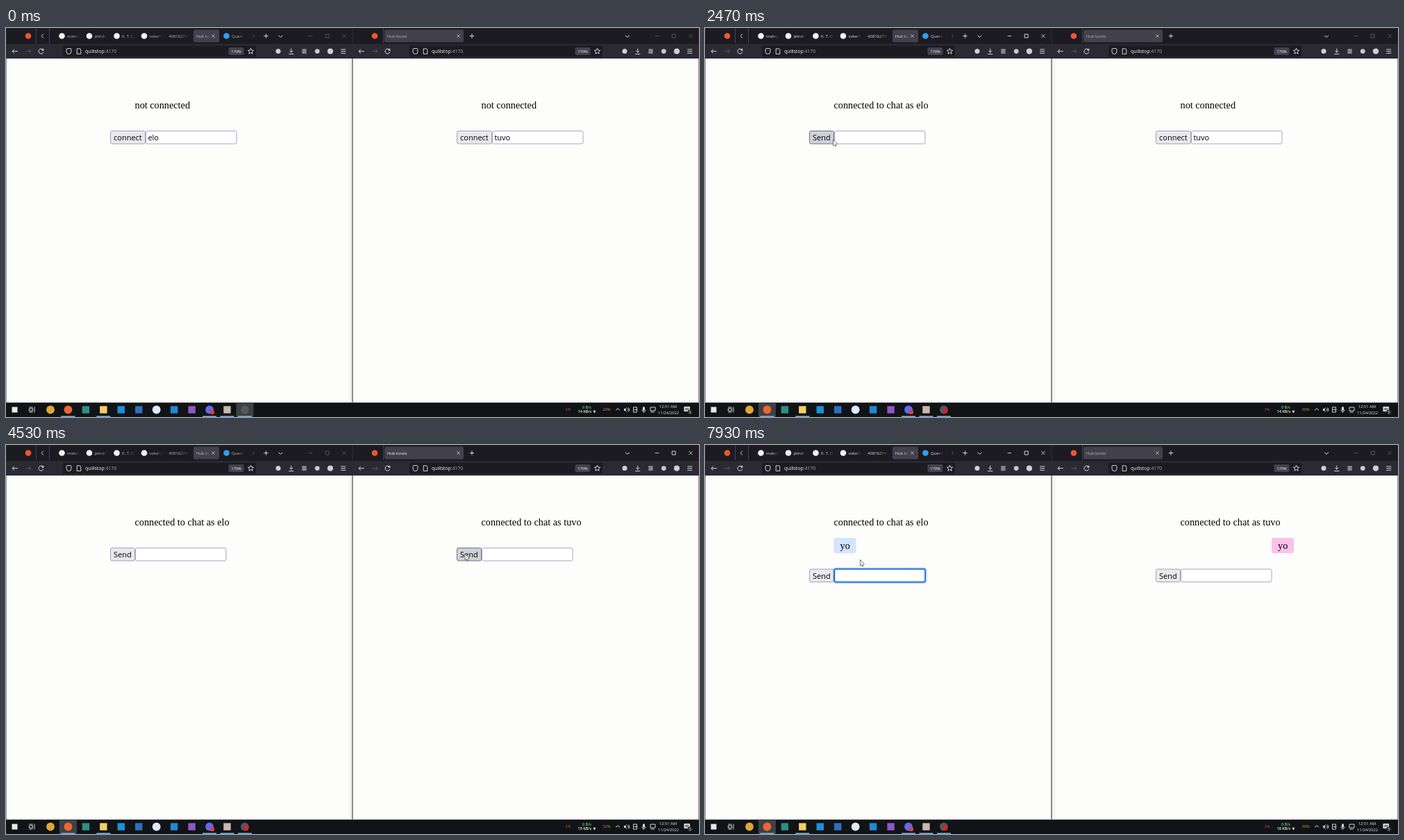
An HTML page with a canvas that plays this animation: 998 by 561 pixels, repeating every 8000 ms.

```html
<!DOCTYPE html>
<html lang="en">
<head>
<meta charset="utf-8">
<title>Two-window chat</title>
<style>
  html, body { margin: 0; width: 100%; height: 100%; overflow: hidden; background: #111417; }
  canvas { display: block; width: 998px; height: 561px; }
</style>
</head>
<body>
<canvas id="stage" width="998" height="561"></canvas>
<script>
const ctx = document.getElementById('stage').getContext('2d');
const W = 998, H = 561, HALF = W / 2, LOOP = 8000;
const PX = W / 1920;              // one desktop pixel on the stage
const PAGE_TOP = 85 * PX, PAGE_END = 1040 * PX;
const SANS = '"Open Sans", "Noto Sans", sans-serif';
const SERIF = '"Liberation Serif", serif';
const LIGHT = '#e8e8ec', DIM = '#5c5b66', DARK = '#1c1b22', BAR = '#2b2a33', TAB = '#42414d';

const USERS = ['elo', 'tuvo'];
const SITE = 'Hub boots';
const AT = {
  record: 400, press: 2090, leftOn: 2210, rightPress: 4405, rightOn: 4490,
  focus: 5480, typeY: 6480, typeO: 7120, send: 7370
};

const START = { x: 420, y: 575 };
const MOVES = [
  { from: 700, to: 1420, x: 184.5, y: 161, bend: 0 },
  { from: 2700, to: 3300, x: 546, y: 197, bend: 65 },
  { from: 3360, to: 4180, x: 661, y: 157, bend: 8 },
  { from: 4640, to: 5180, x: 223.5, y: 165.5, bend: 0 }
];

function pointer(t) {
  let { x, y } = START;
  for (const m of MOVES) {
    const p = Math.min(1, Math.max(0, (t - m.from) / (m.to - m.from)));
    const e = p * p * (3 - 2 * p);
    x += (m.x - x) * e;
    y += (m.y - y) * e - m.bend * Math.sin(Math.PI * e);
  }
  return { x, y };
}

// Drawing helpers
function rect(x, y, w, h, color) {
  ctx.fillStyle = color;
  ctx.fillRect(x, y, w, h);
}

function stroke(color, lw = 0.9) {
  ctx.strokeStyle = color;
  ctx.lineWidth = lw;
  ctx.stroke();
}

function round(x, y, w, h, r, fill, line, lw) {
  ctx.beginPath();
  ctx.roundRect(x, y, w, h, r);
  if (fill) { ctx.fillStyle = fill; ctx.fill(); }
  if (line) stroke(line, lw);
}

// Outlined box around a centre
const box = (x, y, w, h, color, r = 0) => round(x - w / 2, y - h / 2, w, h, r, null, color);

function dot(x, y, r, color) {
  ctx.beginPath();
  ctx.arc(x, y, r, 0, 7);
  ctx.fillStyle = color;
  ctx.fill();
}

function arc(x, y, r, a, b, color) {
  ctx.beginPath();
  ctx.arc(x, y, r, a, b);
  stroke(color);
}

function line(x, y, dx, dy, color, lw) {
  ctx.beginPath();
  ctx.moveTo(x - dx, y - dy);
  ctx.lineTo(x + dx, y + dy);
  stroke(color, lw);
}

// Open arrow head; turns are quarter turns from pointing right
function head(x, y, turns, color, r = 3) {
  ctx.save();
  ctx.translate(x, y);
  ctx.rotate(turns * Math.PI / 2);
  ctx.beginPath();
  ctx.moveTo(-r / 4, -r);
  ctx.lineTo(r * 0.6, 0);
  ctx.lineTo(-r / 4, r);
  stroke(color);
  ctx.restore();
}

function cross(x, y, r, color) {
  line(x, y, r, r, color, 0.8);
  line(x, y, r, -r, color, 0.8);
}

function plus(x, y, color) {
  line(x, y, 3.2, 0, color);
  line(x, y, 0, 3.2, color);
}

function bars(x, y, w, gap, n, color) {
  for (let i = 0; i < n; i++) line(x, y + (i - (n - 1) / 2) * gap, w, 0, color);
}

function star(x, y, r, color) {
  ctx.beginPath();
  for (let i = 0; i < 10; i++) {
    const a = (i / 5 - 0.5) * Math.PI, d = i % 2 ? r * 0.45 : r;
    ctx.lineTo(x + d * Math.cos(a), y + d * Math.sin(a));
  }
  ctx.closePath();
  stroke(color);
}

function text(s, x, y, size, color, { font = SANS, align = 'left', weight = 400 } = {}) {
  ctx.font = `${weight} ${size}px ${font}`;
  ctx.textAlign = align;
  ctx.fillStyle = color;
  ctx.fillText(s, x, y);
  return ctx.measureText(s).width;
}

const serif = (s, x, y) => text(s, x, y, 14.25, '#000', { font: SERIF });
const label = (s, x, y) => text(s, x, y, 11, '#000', { weight: 500 });

function fadeText(s, x, width, alpha) {
  const g = ctx.createLinearGradient(x, 0, x + width, 0);
  const color = `rgba(251,251,254,${alpha})`;
  g.addColorStop(0, color);
  g.addColorStop(0.55, color);
  g.addColorStop(1, 'rgba(251,251,254,0)');
  text(s, x, 13.8, 5.87, g);
}

// Browser windows
const TABS = [
  { title: 'malvop', icon: '#f2f2f4' }, { title: 'plindr', icon: '#f2f2f4' },
  { title: 'K. T. O', icon: '#f2f2f4' }, { title: 'vokel4', icon: '#f2f2f4' },
  { title: '40816274' }, { title: SITE, open: true }, { title: 'Quenor', icon: '#2da1f0' }
];

function leftTabs(active) {
  line(43.5, 11, 0, 11, '#4b4a55');
  line(62.5, 11, 0, 11, '#4b4a55');
  head(53, 11.5, 2, LIGHT);
  TABS.forEach(({ title, icon, open }, i) => {
    const x = 80.5 + i * 39.5;
    if (open) {
      round(x - 8, 2.5, 37, 18, 2, TAB);
      cross(x + 20.5, 11.5, 2, LIGHT);
    }
    if (icon) dot(x, 11.5, 4.3, icon);
    fadeText(title, x + (icon ? 7.5 : -4.3), icon ? 18 : open ? 21 : 30, active ? 0.85 : 0.68);
  });
  head(356, 11.5, 0, DIM, 2.5);
  plus(374.5, 11.5, LIGHT);
  head(395.5, 11.5, 1, LIGHT);
}

function rightTabs(active) {
  line(543.5, 11, 0, 11, '#4b4a55');
  round(545, 2.5, 114, 18, 2, TAB);
  text(SITE, 549, 13.8, 5.87, active ? '#fbfbfe' : '#b9b9c0');
  cross(651.5, 11.5, 2, LIGHT);
  plus(671, 11.5, LIGHT);
  head(895, 11.5, 1, LIGHT);
}

function windowButtons(x, active) {
  const c = active ? LIGHT : DIM;
  line(x + 438.5, 11.5, 2.8, 0, c, 0.8);
  box(x + 462.7, 11.5, 5, 5, c);
  cross(x + 487, 11.5, 2.6, c);
}

function toolbar(x) {
  const y = 33.6;
  rect(x, 23, HALF, PAGE_TOP - 23, BAR);
  line(x + 13, y, 3.8, 0, LIGHT);
  head(x + 11, y, 2, LIGHT);
  line(x + 32, y, 3.8, 0, DIM);
  head(x + 34, y, 0, DIM);
  arc(x + 50.5, y, 3.4, 0.3, 5.4, LIGHT);
  box(x + 53, y - 2.2, 2, 2, LIGHT);

  round(x + 82, 25.5, 278, 16, 2, DARK);
  box(x + 90.5, y, 6.8, 8, LIGHT, [1, 1, 3.4, 3.4]);
  box(x + 105, y, 5.6, 7.6, LIGHT, [0, 2, 0, 0]);
  const w = text('quillstop', x + 114, 36, 6.85, '#fbfbfe');
  text(':4170', x + 114 + w, 36, 6.85, '#a9a9b1');
  round(x + 320.5, 28, 22, 11, 2, TAB);
  text('170%', x + 331.5, 35.7, 5.8, '#fbfbfe', { align: 'center' });
  star(x + 352.5, y, 4.4, LIGHT);

  const slot = i => x + 392 + i * 18.75;
  dot(slot(0), y, 3.5, '#d0d0d5');
  line(slot(1), y - 1.2, 0, 2.8, LIGHT);
  head(slot(1), y, 1, LIGHT, 2.4);
  line(slot(1), y + 4, 3.5, 0, LIGHT);
  rect(slot(2) - 3.2, y - 3.5, 6.4, 7, '#85858c');
  dot(slot(3), y, 3.4, '#c8c8cd');
  dot(slot(4), y, 4.1, '#d0d0d5');
  bars(slot(5), y, 3.5, 2.7, 3, LIGHT);
}

function browser(side, active) {
  const x = side * HALF;
  rect(x, 0, HALF, 23, DARK);
  dot(x + 32, 11.5, 4.3, '#f0552f');
  (side ? rightTabs : leftTabs)(active);
  windowButtons(x, active);
  toolbar(x);
  rect(x, PAGE_TOP, HALF, PAGE_END - PAGE_TOP, '#fdfdfc');
  ctx.strokeStyle = '#2e2d35';
  ctx.lineWidth = PX;
  ctx.strokeRect(x + PX / 2, PX / 2, HALF - PX, PAGE_END - PX);
}

// The active window casts a faint shade on its neighbour
function shade(onLeft) {
  const reach = onLeft ? -7 : 7;
  const g = ctx.createLinearGradient(HALF, 0, HALF + reach, 0);
  g.addColorStop(0, 'rgba(0,0,0,.07)');
  g.addColorStop(1, 'rgba(0,0,0,0)');
  rect(HALF, PAGE_TOP, reach, PAGE_END - PAGE_TOP, g);
}

// Chat page; returns whether the pointer is over the text field
function chat(side, t, p) {
  const ox = side * HALF;
  const on = t >= (side ? AT.rightOn : AT.leftOn);
  const sent = t >= AT.send;
  const x = 150 + ox, y = sent ? 178.8 : 148.3, h = 19;
  const bw = on ? 36 : 51, ix = x + bw, iw = 131.5;
  const base = y + 13.9;

  const inRow = p.y >= y && p.y <= y + h;
  const overButton = inRow && p.x >= x && p.x < ix;
  const overInput = inRow && p.x >= ix && p.x <= ix + iw;
  const held = t - (side ? AT.rightPress : AT.press);
  const pressed = overButton && held >= 0 && held < 85;
  const focused = !side && t >= AT.focus;

  serif(on ? 'connected to chat as ' + USERS[side] : 'not connected', 185.5 + ox, 116);
  if (sent) {
    const bx = side ? 816 : 185.5;
    round(bx, 134, 32, 22, 3, side ? '#fbc2e9' : '#d3e4fb');
    serif('yo', bx + 9, 150);
  }

  const fill = pressed ? '#b1b1b9' : overButton ? '#d0d0d7' : '#e9e9ed';
  round(x + 0.5, y + 0.2, bw - 1, h - 0.5, 2.2, fill, overButton ? '#676774' : '#9a9aae');
  label(on ? 'Send' : 'connect', x + 5, base);

  if (focused) round(ix - 0.5, y - 0.8, iw + 1, h + 1.5, 3, null, 'rgba(0,96,223,.35)', 2.4);
  const edge = focused ? '#0060df' : overInput ? '#676774' : '#9e9ec4';
  round(ix + 0.5, y + 0.2, iw - 1, h - 0.5, 2, '#fff', edge, focused ? 1.5 : 0.9);

  const typed = t < AT.typeY || sent ? '' : t < AT.typeO ? 'y' : 'yo';
  const value = !on ? USERS[side] : focused ? typed : '';
  const w = label(value, ix + 3.4, base);

  if (focused) {
    const last = [AT.send, AT.typeO, AT.typeY, AT.focus].find(e => t >= e);
    if ((t - last) % 1000 < 500) rect(ix + 3.8 + w, y + 3.5, 0.8, 12.5, '#000');
    if (value) {
      rect(ix, y + 19.4, iw - 0.5, 11.3, BAR);
      text('yo', ix + 3.2, y + 27, 5.8, '#e6e6ea');
    }
  }
  return overInput;
}

// Taskbar
const APPS = [
  { color: '#e2a53a', disc: true }, { color: '#f0652f', disc: true, open: true },
  { color: '#2f8f86' }, { color: '#f5cf62', open: true }, { color: '#1c8fdc' }, { color: '#2f6fc0' },
  { color: '#dcebfa', disc: true }, { color: '#1f8ad2' }, { color: '#8f56c8' },
  { color: '#5f6bea', disc: true, open: true }, { color: '#c9b9a8', open: true },
  { color: '#55565a', disc: true, open: true }
];

function tray(y) {
  const slot = i => 881 + i * 12.5;
  head(slot(0), y, 3, LIGHT);
  rect(slot(1) - 3.5, y - 1.4, 2.5, 2.8, LIGHT);
  head(slot(1) - 0.6, y, 2, LIGHT);
  for (const r of [2.4, 4.2]) arc(slot(1), y, r, -0.8, 0.8, LIGHT);
  box(slot(2), y, 4.8, 7.2, LIGHT);
  line(slot(2) + 1, y, 2.4, 0, LIGHT);
  round(slot(3) - 1.4, y - 4.2, 2.8, 5.4, 1.4, LIGHT);
  arc(slot(3), y, 2.6, 0, Math.PI, LIGHT);
  line(slot(3), y + 3.4, 0, 1, LIGHT);
  box(slot(4) + 0.5, y - 1, 7, 5, LIGHT);
  line(slot(4), y + 3.5, 2.6, 0, LIGHT);
}

function taskbar(t, recorderActive) {
  const y = 550.5, mid = { align: 'center' };
  const appX = i => 64 + i * 25.45;
  rect(0, PAGE_END, W, H - PAGE_END, '#111417');
  rect(appX(recorderActive ? 11 : 1) - 12.5, PAGE_END, 25, 21, '#3c4144');
  rect(8.5, 546.5, 8, 8, LIGHT);
  box(36, y, 5.2, 3.2, LIGHT);
  bars(36, y, 2.6, 7, 2, LIGHT);
  line(41, y, 0, 4, LIGHT);

  APPS.forEach(({ color, disc, open }, i) => {
    const x = appX(i);
    if (disc) dot(x, y, 5.9, color);
    else rect(x - 5.2, y - 5.2, 10.4, 10.4, color);
    if (open) rect(x - 10, 559.5, 20, 1.5, '#76b9ed');
  });
  dot(297, 554, 3.2, '#e23c3c');
  if (t >= AT.record) dot(346, 552.5, 3.4, '#e01f26');

  const busy = t >= 4000, settled = t >= 6850;
  const cpu = t < 1000 ? 2 : busy && !settled ? 5 : 3;
  const rate = 14 + busy + 3 * settled;
  text(cpu + '%', 809.5, 552.3, 5.6, '#d8403c', mid);
  text('0 B/s', 836.5, 549.3, 5.5, '#62dc6a', { ...mid, weight: 600 });
  text(rate + ' KB/s', 823.5, 555.4, 5.5, '#f4f4e6', { weight: 600 });
  text('▼', 847.5, 555.2, 5, '#f4f4e6', { ...mid, font: '"DejaVu Sans", sans-serif' });
  text(cpu + 27 + '%', 865, 552.3, 5.6, '#e58a2e', mid);

  tray(y);
  text('12:51 AM', 953.3, 548.4, 5.87, LIGHT, mid);
  text('11/24/2022', 954, 557.2, 5.7, LIGHT, mid);
  round(976.5, 546, 8.5, 7, 0.6, LIGHT);
  bars(980.8, 549.5, 2.8, 2.2, 2, '#111417');
  dot(985, 554, 3.5, '#2c3033');
  text('5', 985, 556, 5.3, LIGHT, mid);
}

// Pointer shapes
function arrow(x, y) {
  line(x + 3.3, y + 8, 0.8, 1.6, '#3a3a3e', 2);
  ctx.beginPath();
  ctx.moveTo(x, y);
  ctx.lineTo(x, y + 8.6);
  ctx.lineTo(x + 6, y + 6.2);
  ctx.closePath();
  ctx.fillStyle = '#fff';
  ctx.fill();
  stroke('#3a3a3e', 0.7);
  line(x + 3.1, y + 7.5, 0.7, 1.5, '#fff', 0.9);
}

function beam(x, y) {
  line(x, y, 0, 3.8, '#333');
  bars(x, y, 2, 7.6, 2, '#333');
}

function draw(t) {
  const p = pointer(t);
  const recorder = t < AT.press;
  const leftActive = !recorder && (t < AT.rightPress || t >= AT.focus);

  browser(0, leftActive);
  browser(1, !recorder && !leftActive);
  shade(!leftActive);
  const overField = [0, 1].map(side => chat(side, t, p)).includes(true);
  taskbar(t, recorder);
  (overField ? beam : arrow)(p.x, p.y);
}

function tick() {
  draw(performance.now() % LOOP);
  requestAnimationFrame(tick);
}
tick();
</script>
</body>
</html>
```
